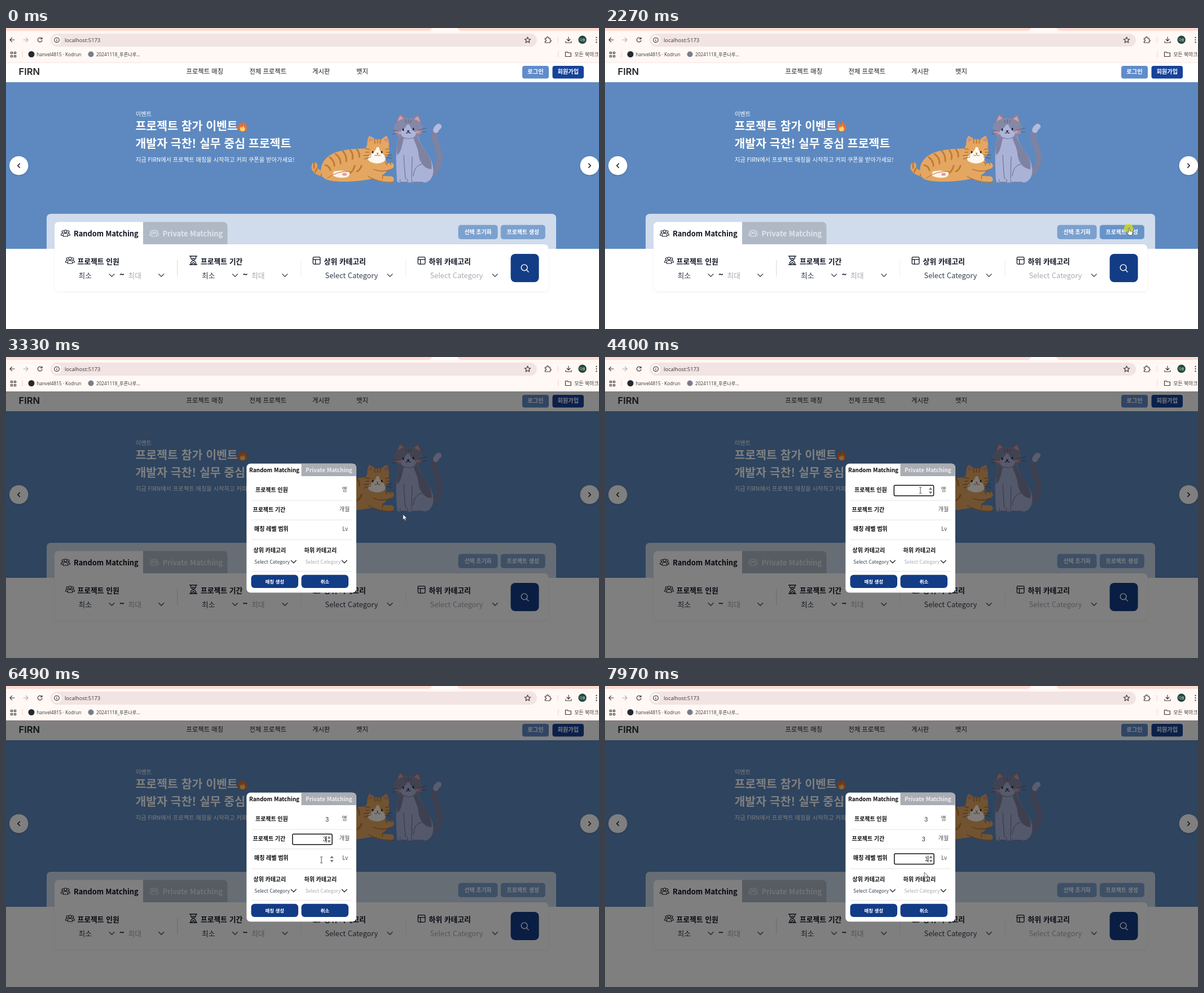
Recreate the animation shown at these times as an HTML page. Size 1051x533 px, loop 8000 ms.

```html
<!DOCTYPE html>
<html lang="ko">
<head>
<meta charset="utf-8">
<title>Project matching</title>
<style>
  html, body { margin: 0; width: 100%; height: 100%; overflow: hidden; background: #fff; }
  svg.stage { display: block; width: 100vw; height: 100vh; }
  text { font-family: "Noto Sans CJK KR", "Noto Sans CJK", "Noto Sans KR", sans-serif; white-space: pre; }
  .chrome text { font-family: "Open Sans", "Noto Sans CJK KR", "Noto Sans CJK", sans-serif; fill: #3b3636; }
  .logo { font: 600 16.5px Inter, sans-serif; fill: #25272b; }
  .nav { font-size: 11.3px; font-weight: 500; fill: #1c1c1c; }
  .bold { font-weight: 700; }
  .small { font-size: 10.25px; }
  .mid { text-anchor: middle; }
  .white { fill: #fff; }
  .title { font-size: 20.5px; font-weight: 700; fill: #fff; }
  .field { font-size: 12.8px; font-weight: 700; fill: #0c1220; }
  .value { font-size: 12.8px; fill: #374151; }
  .action { font-size: 9.9px; font-weight: 700; fill: #fff; text-anchor: middle; }
  .label { font-size: 9.95px; font-weight: 700; fill: #0a0a0a; }
  .unit { font-size: 9.9px; fill: #4a4a4a; }
  .option { font-size: 8.55px; fill: #374151; }
  .value.off, .option.off { fill: #a6abb3; }
  .digit { font: 11px "Liberation Sans", Arial, sans-serif; fill: #333; text-anchor: middle; }
  .line { fill: none; stroke-linecap: round; stroke-linejoin: round; }
</style>
</head>
<body>
<svg class="stage" viewBox="0 0 1051 533" preserveAspectRatio="none">
  <defs>
    <filter id="soft" x="-20%" y="-20%" width="140%" height="150%">
      <feDropShadow dx="0" dy="1" stdDeviation="1.6" flood-opacity=".22"/>
    </filter>
    <filter id="faint" x="-5%" y="-20%" width="110%" height="150%">
      <feDropShadow dx="0" dy="1" stdDeviation="1.5" flood-opacity=".08"/>
    </filter>
    <g id="people" class="line" stroke-width="1.1">
      <circle cx="8.5" cy="3.2" r="2.5"/>
      <path d="M4.3 12v-1.8a4.2 3.7 0 0 1 8.4 0V12Z"/>
      <path d="M5.2 2.2a2 2 0 1 0-.8 3.6M4 6.2Q.6 6.3.5 10h3.2M11.8 2.2a2 2 0 1 1 .8 3.6M13 6.2q3.4.1 3.5 3.8h-3.2"/>
    </g>
    <g id="layout" class="line" stroke="#111827" stroke-width="1.3">
      <rect x=".7" y=".7" width="12.6" height="12.4" rx="1.6"/><path d="M.7 4.8h12.6M5 4.8v8.3"/>
    </g>
    <path id="chev" class="line" d="M-4.4-2.2 0 2.3 4.4-2.2" stroke-width="1.5"/>
  </defs>

  <!-- browser bar -->
  <g class="chrome">
    <path d="M0 0H1051V62H0Z" fill="#fff8f5"/>
    <path d="M0 0H755Q753 5 748 5H0ZM800 0H1051V5H808Q802 5 800 0Z" fill="#fddad0"/>
    <rect x="79" y="10" width="862" height="23" rx="11.5" fill="#f2e4e2"/>
    <circle cx="90" cy="21.3" r="8.3" fill="#fff8f5"/>
    <g class="line" stroke="#403a3a" stroke-width="1.2">
      <path d="M15 21H7.2M10.6 17.4 7 21l3.6 3.6"/>
      <path d="M31 21h7.8M35.4 17.4 39 21l-3.6 3.6" stroke="#b5acaa"/>
      <path d="M63.3 18.6A3.9 3.9 0 1 0 64 22M64 16.9v2.6h-2.7"/>
      <circle cx="90" cy="21.3" r="4.3"/><path d="M90 21v2.2M90 19.2v.1"/>
      <path d="m924.5 16 1.5 3.5 3.7.3-2.8 2.5.9 3.7-3.3-2-3.3 2 .9-3.7-2.8-2.5 3.7-.3Z"/>
      <path d="M955.5 18h3q-.4-2.3 1.4-2.3T961.3 18h3v3q2 0 2 1.300t-2 1.300V26h-8.800v-2.700q2 .2 2-1.400t-2-1.400Z"/>
      <path d="M997 16v6.5M994 20l3 3 3-3M992 23.5V26h10v-2.5"/>
      <path d="M8.500 42.5h3v3h-3ZM14.5 42.5h3v3h-3ZM8.500 48.5h3v3h-3ZM14.5 48.5h3v3h-3Z"/>
      <path d="M991.5 50.5v-8h3.5l1.3 1.5h5v6.5Z"/>
    </g>
    <path d="M29 41v11M978 16v10M979 41v11" stroke="#f7cfc6"/>
    <circle cx="1021.6" cy="20.8" r="7.2" fill="#21463b"/>
    <text x="1021.6" y="23" font-size="5.6" class="mid" style="fill:#fff">다솔</text>
    <path d="M1046.5 16.8v.1M1046.5 21v.1M1046.5 25.2v.1" class="line" stroke="#403a3a" stroke-width="2.2"/>
    <text x="104" y="24.6" font-size="9.4">localhost:5173</text>
    <circle cx="45" cy="46.5" r="5.5" fill="#24292f"/>
    <text x="54.5" y="49.6" font-size="8.2">hanvel4815 · Kodrun</text>
    <circle cx="150.5" cy="46.5" r="5" fill="#777d8b"/>
    <text x="160" y="49.6" font-size="8.2">20241118_푸른나루...</text>
    <text x="1007.5" y="49.8" font-size="8.8">모든 북마크</text>
  </g>

  <!-- page -->
  <rect y="61" width="1051" height="472" fill="#fff"/>
  <path d="M0 61.2H1051" stroke="#f3ddd8" stroke-width=".8"/>
  <text class="logo" x="22.5" y="83.3">FIRN</text>
  <g class="nav">
    <text x="319.5" y="81.4">프로젝트 매칭</text><text x="431.5" y="81.4">전체 프로젝트</text>
    <text x="543" y="81.4">게시판</text><text x="621" y="81.4">뱃지</text>
  </g>
  <rect x="915" y="67" width="47" height="22.5" rx="4" fill="#608cca"/>
  <rect x="968.5" y="67" width="55.5" height="22.5" rx="4" fill="#17429a"/>
  <text class="small bold mid white" x="938.5" y="81.3">로그인</text>
  <text class="small bold mid white" x="996.3" y="81.3">회원가입</text>

  <rect y="96" width="1051" height="295" fill="#5d89c0"/>
  <text class="small white" x="229.8" y="155.5">이벤트</text>
  <text class="title" x="229.5" y="181">프로젝트 참가 이벤트</text>
  <text class="title" x="229.5" y="211.5">개발자 극찬! 실무 중심 프로젝트</text>
  <text class="small white" x="229.8" y="236.7">지금 <tspan font-weight="500">FIRN</tspan>에서 프로젝트 매칭을 시작하고 커피 쿠폰을 받아가세요!</text>
  <path d="M420 162c1 7 8 9 7.5 16-.5 7.5-16.5 7.5-16.5-1 0-5 3-6 3.5-10 2.5 2 3 4 3.5 5 2-3 2.5-6 2-10Z" fill="#e5702f"/>
  <path d="M420 171.5c.5 3.5 4 4.5 3.8 8-.3 4.5-9 4.5-9 0 0-2.5 1.2-3 1.6-5 1.2.8 1.6 2 1.8 2.5 1.4-1.5 2-3 1.800-5.5Z" fill="#fbcf78"/>

  <!-- grey cat -->
  <g class="line">
    <path d="M742 265C772 254 772 228 763 207 757 192 759 181 766 174" stroke="#7f82a0" stroke-width="10"/>
    <path d="M762 181q1-4 5-6.5" stroke="#b3bbdf" stroke-width="10"/>
    <path d="M697 190C690 210 691 240 693 270q0 3.5 5 3.5h46c17-5 18-31 1-54-10-14-13-20-14-28Z" fill="#aab2d8"/>
    <path d="M730 192c2 9 6 15 14 26 8 11 12 22 10 32-13 0-22-14-23-28-1-10-7-20-9-28ZM697 191c-4 12-5 20-4 34 7-3 9-18 12-30Z" fill="#7f82a0"/>
    <path d="M705 225q1 24 3 42M720 228q-1 22-1 38M722 262q1-18 15-21M699 268q-3 4 2 5h10q3-3-1-6M719 268q-2 4 3 5h17" stroke="#5c607e" stroke-width=".9"/>
    <path d="M689 174Q692 158 699 151q7 4 12 12ZM716 162q7-7 15-10 5 8 6 21Z" fill="#7f82a0"/>
    <path d="M693 170q2-10 6-15 4 3 7 8ZM722 163q4-5 8-7 3 5 4 12Z" fill="#d59ca8"/>
    <ellipse cx="713" cy="178" rx="26" ry="18.5" fill="#8588a6"/>
    <path d="M711 171q-3 7-11 11-2 12 12 13t15-10q-10-5-12-14Z" fill="#aeb5da"/>
    <path d="M690 185q5-5 10 0t-9 2ZM726 184q5-5 10-1t-10 3Z" fill="#d59ca8"/>
    <path d="M704 179v2M722 178v2" stroke="#20263d" stroke-width="2.6"/>
    <path d="m711 182 4-.2-2 2.2ZM713 184q-1 3-4 2M713 184q1 3 4 2" stroke="#20263d" fill="#20263d" stroke-width=".8"/>
    <path d="M696 183l-10-2M696 186l-11 2M730 181l15-4M731 184l14 0M708 163l1 5M713 162v6M718 163l-1 5" stroke="#4f5474" stroke-width=".8"/>
  </g>

  <!-- orange cat -->
  <g class="line">
    <path d="M547 243C543 252 556 259 574 260" stroke="#dfa15e" stroke-width="10"/>
    <path d="M546 239v9M551 249l-3 6M561 253l-2 8" stroke="#bd7431" stroke-width="2.4"/>
    <path d="M560 260C553 240 570 221 597 217c17-4 32-3 45-4 22 4 36 20 34 37-1 14-40 22-76 22-22 0-38-2-40-12Z" fill="#e4a762"/>
    <path d="M574 229q8 6 8 15M584 223q9 6 9 17M597 218q7 7 6 18M610 216q6 7 4 16M622 215q5 6 4 13M566 243q7 1 9 9M610 257q6-5 8-13M622 254q6-3 8-10" stroke="#c27b34" stroke-width="3"/>
    <path d="M640 256q20 13 42 12M648 242q16 10 34 2" stroke="#e4a762" stroke-width="11"/>
    <path d="M642 263q20 11 44 10M651 250q17 7 32 0M672 237l3 6M681 237l1 5M668 261l-1 6" stroke="#b06b2b" stroke-width="1.3"/>
    <path d="M581 254q16-4 28 2 1 8-9 9-14 1-21-4Z" fill="#fff3e8"/>
    <ellipse cx="600" cy="259" rx="4" ry="2.6" fill="#e2989b"/>
    <path d="M569 266q20-14 41-12" stroke="#b06b2b"/>
    <path d="M640 208q0-12 4-17 8 3 12 9ZM664 199q6-7 11-8 4 7 4 18Z" fill="#e4a762"/>
    <path d="M643 202q0-5 2-8 4 2 6 5ZM669 199q3-4 6-5 2 4 2 8Z" fill="#d88b7e"/>
    <ellipse cx="658.5" cy="216" rx="21" ry="19" fill="#e4a762"/>
    <path d="M657 211q-2 9-13 14-5 9 2 12 12 6 23 0 6-4 2-12-9-5-10-14Z" fill="#fff7ee"/>
    <path d="M653 198l1 6M658.5 197v7M664 198l-1 6M638 214l6 1M638 220l5 0M679 214l-6 1M679 220l-5 0" stroke="#c27b34" stroke-width="2"/>
    <path d="M650 219v1.5M666 219v1.5" stroke="#2b2018" stroke-width="2.6"/>
    <path d="m656.5 221 4 0-2 2.4Z" fill="#c9696b"/>
    <path d="M658.5 223.5q-1 4-5 2M658.5 223.5q1 4 5 2M647 225l-13 1M647 228l-12 4M671 225l13 0M671 228l12 3" stroke="#6a4426" stroke-width=".8"/>
  </g>

  <g filter="url(#soft)" fill="#fff"><circle cx="22.7" cy="243.6" r="16.7"/><circle cx="1034.3" cy="243.6" r="16.7"/></g>
  <path class="line" d="M24.3 240.2 20.8 243.7l3.5 3.5M1032.7 240.2l3.5 3.5-3.5 3.5" stroke="#111" stroke-width="1.5"/>

  <path d="M72 391V337q0-8 8-8H967q8 0 8 8v54Z" fill="#d0dbec"/>
  <path d="M86 383H953q8.5 0 8.5 8.5V458q0 8.5-8.5 8.5H94.5q-8.5 0-8.5-8.5Z" fill="#fff" filter="url(#faint)"/>
  <path d="M86 392V351.5q0-8 8-8h149V392Z" fill="#fff"/>
  <path d="M243 343.5H384.5q8 0 8 8V383H243Z" fill="#afb9c6"/>
  <use href="#people" x="97" y="357" stroke="#111827"/>
  <use href="#people" x="254" y="357" stroke="#e1e5ea"/>
  <text class="field" x="120" y="369">Random Matching</text>
  <text class="field" x="277.5" y="369" style="fill:#e1e5ea">Private Matching</text>
  <rect x="801.5" y="348.7" width="70" height="25.3" rx="5" fill="#7ca1ce"/>
  <rect id="create" x="876.8" y="348.7" width="79" height="25.3" rx="5" fill="#7ca1ce"/>
  <text class="action" x="836.5" y="364.5">선택 초기화</text>
  <text class="action" x="916.2" y="364.5">프로젝트 생성</text>

  <use href="#people" x="105" y="405" stroke="#111827"/>
  <path class="line" d="M325.5 404h13M325.5 419h13M327.5 404v3q0 2 4.5 4.5-4.5 2.5-4.5 4.5v3M336.5 404v3q0 2-4.5 4.5 4.5 2.5 4.5 4.5v3M329 418l3-3 3 3M330 408h4" stroke="#111827" stroke-width="1.3"/>
  <use href="#layout" x="543.5" y="405"/><use href="#layout" x="729.5" y="405"/>
  <g class="field">
    <text x="126.5" y="417.6">프로젝트 인원</text><text x="345" y="417.6">프로젝트 기간</text>
    <text x="563.5" y="417.6">상위 카테고리</text><text x="749.5" y="417.6">하위 카테고리</text>
    <text x="201" y="442" font-size="15">~</text><text x="419.5" y="442" font-size="15">~</text>
  </g>
  <text class="value" x="128.5" y="443.2">최소</text><text class="value off" x="216.5" y="443.2">최대</text>
  <text class="value" x="347" y="443.2">최소</text><text class="value off" x="435" y="443.2">최대</text>
  <text class="value" x="565.5" y="443.2">Select Category</text><text class="value off" x="751.5" y="443.2">Select Category</text>
  <g stroke="#4b5563">
    <use href="#chev" x="187.5" y="438"/><use href="#chev" x="275.3" y="438"/><use href="#chev" x="406" y="438"/>
    <use href="#chev" x="494.3" y="438"/><use href="#chev" x="680.5" y="438"/><use href="#chev" x="866.7" y="438"/>
  </g>
  <path d="M303.8 411v29" stroke="#d3d8df"/><path d="M522.5 411v29M708.8 411v29" stroke="#eceef2"/>
  <rect x="894.5" y="400" width="50" height="50" rx="8" fill="#133c86"/>
  <g class="line" stroke="#fff" stroke-width="1.4"><circle cx="918.6" cy="424.3" r="5.4"/><path d="m922.6 428.4 3.5 3.5"/></g>

  <!-- dialog -->
  <g id="dialog">
    <rect y="61" width="1051" height="472" fill="#000" opacity=".5"/>
    <rect x="426.3" y="188.8" width="194.5" height="228.5" rx="7" fill="#fff"/>
    <path d="M523.5 188.8H613.8q7 0 7 7V211H523.5Z" fill="#aaadb3"/>
    <text class="label" x="431" y="204.3">Random Matching</text>
    <text class="label" x="531" y="204.3" style="fill:#eceef1">Private Matching</text>
    <path d="M434.5 254H613M434.5 288.5H613M434.5 323.5H613M434.5 379.5H613" stroke="#e2e4e8"/>
    <text class="label" x="442" y="238.6">프로젝트 인원</text><text class="unit" x="595.5" y="237.8">명</text>
    <text class="label" x="437.5" y="273.6">프로젝트 기간</text><text class="unit" x="590.8" y="272.8">개월</text>
    <text class="label" x="440" y="308.2">매칭 레벨 범위</text><text class="unit" x="596" y="307.5">Lv</text>
    <text class="label" x="438.5" y="346.2">상위 카테고리</text><text class="label" x="528.5" y="346.2">하위 카테고리</text>
    <text class="option" x="440.3" y="366.2">Select Category</text><text class="option off" x="530.5" y="366.2">Select Category</text>
    <g stroke="#333"><use href="#chev" x="509.8" y="362.5"/><use href="#chev" x="599.7" y="362.5"/></g>
    <rect x="434.5" y="385.8" width="83.5" height="23.2" rx="6" fill="#133c86"/>
    <rect x="523.5" y="385.8" width="83.5" height="23.2" rx="6" fill="#133c86"/>
    <text class="action" x="476.3" y="400.6" style="font-size:8.5px">매칭 생성</text>
    <text class="action" x="565.2" y="400.6" style="font-size:8.5px">취소</text>
    <g id="inputs"></g>
  </g>

  <circle id="click" cx="928" cy="355" r="8.3" fill="#d6dc22" opacity=".8"/>
  <g id="pointer" stroke-linejoin="round">
    <path id="arrow" d="M0 0V9.5L2.2 7.5 3.9 11 5.5 10.3 3.9 6.9H7Z" fill="#fff" stroke="#444" stroke-width=".8"/>
    <path id="hand" d="M-1 1.2q0-1.2 1-1.2t1 1.2v4l4.3 1q1.2.4 1 1.8l-.7 3.5-1 1.5h-5l-3.6-5q-.2-1.5 1.4-.9l1.6 1.2Z" fill="#fff" stroke="#444" stroke-width=".8"/>
    <path id="beam" d="M-2-5.3h1.3L0-4.7l.7-.6H2M0-4.7V4.7M-2 5.3h1.3L0 4.7l.7.6H2" fill="none" stroke="#444"/>
  </g>
</svg>
<script>
const LOOP = 8000, APPEAR = 460, CLICK = 2200, OPEN = 2330;
const byId = id => document.getElementById(id);
const show = (el, on) => el.setAttribute('visibility', on ? 'inherit' : 'hidden');

// Pointer moves: first step, last step, step count, end x, end y
const start = [936, 512];
const moves = [
  [460, 600, 3, 886, 407], [670, 810, 3, 829, 422],
  [1010, 1360, 6, 861, 388], [1430, 1640, 4, 928, 344],
  [1780, 2060, 5, 929, 354], [2540, 2610, 2, 934, 366],
  [2810, 3600, 11, 572, 229], [3720, 3940, 4, 563, 271],
  [4270, 4400, 3, 559, 236], [4470, 5070, 8, 552, 240],
  [5140, 5350, 4, 560, 271], [5480, 5690, 4, 564, 288],
  [5890, 5890, 1, 564, 289], [6160, 6160, 1, 562, 296],
  [6420, 6490, 2, 559, 308], [7000, 7380, 5, 566, 324],
  [7640, 7710, 2, 566, 328], [7970, 7970, 1, 566, 330]
];

const inputs = [
  { x: 512, y: 227, text: '3', focus: 3600, typed: 4800, blur: 5420 },
  { x: 507.5, y: 262, text: '3', focus: 5420, typed: 6420, blur: 6760 },
  { x: 512.5, y: 296.8, text: '1', focus: 6760, typed: 7640, blur: LOOP }
];
byId('inputs').innerHTML = inputs.map(({ x, y, text }) => `<g transform="translate(${x} ${y})">
  <rect x=".3" y=".3" width="70.2" height="18.4" rx="2" fill="none" stroke="#111" stroke-width="1.5"/>
  <path d="m61.8 8.3 3.2-4.5 3.2 4.5ZM61.8 11.2l3.2 4.5 3.2-4.5Z" fill="#7d7d7d"/>
  <text class="digit" x="57" y="13.4">${text}</text>
  <path d="M60 3.5v12" stroke="#111"/></g>`).join('');
inputs.forEach((input, i) => input.parts = [...byId('inputs').children[i].children]);

function pointerAt(t) {
  let [x, y] = start;
  for (const [from, to, count, endX, endY] of moves) {
    if (t < from) break;
    const step = t >= to ? count : Math.floor((t - from) / (to - from) * (count - 1)) + 1;
    x += (endX - x) * step / count;
    y += (endY - y) * step / count;
  }
  return [x, y];
}

const inside = (x, y, left, top, w, h) => x >= left && x <= left + w && y >= top && y <= top + h;

function render(t) {
  const [x, y] = pointerAt(t), open = t >= OPEN;
  const over = open ? inputs.find(i => inside(x, y, i.x, i.y, 71, 19)) : null;
  const onButton = !open && (inside(x, y, 877, 343, 79, 31) || inside(x, y, 894, 400, 50, 50));
  const kind = onButton ? 'hand' : over && x < over.x + 60 ? 'beam' : 'arrow';

  byId('pointer').setAttribute('transform', `translate(${x} ${y})`);
  show(byId('pointer'), t >= APPEAR);
  for (const name of ['arrow', 'hand', 'beam']) show(byId(name), name === kind);
  show(byId('click'), t >= CLICK && !open);
  byId('create').setAttribute('fill', t >= CLICK && !open ? '#6793c8' : '#7ca1ce');
  show(byId('dialog'), open);

  for (const input of inputs) {
    const [box, spinner, digit, caret] = input.parts;
    const focused = t >= input.focus && t < input.blur, typed = t >= input.typed;
    show(box, focused);
    show(spinner, focused || input === over);
    show(digit, typed);
    show(caret, focused && typed);
  }
}

function tick() {
  render(performance.now() % LOOP);
  requestAnimationFrame(tick);
}
tick();
</script>
</body>
</html>
```
